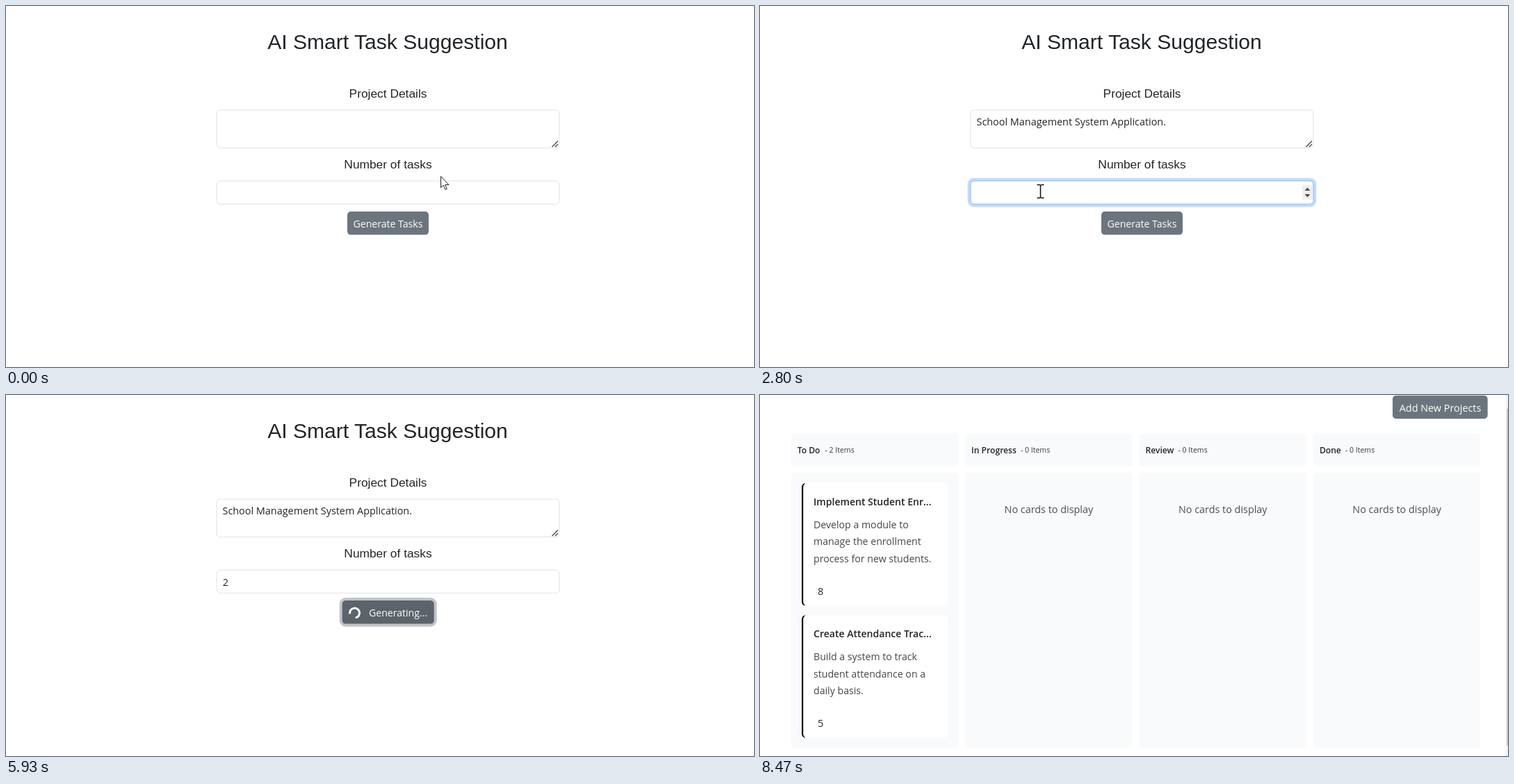
Write an HTML page that moves like this. It is 1076 by 520 pixels and loops after 9470 ms.

```html
<!DOCTYPE html>
<html lang="en">
<head>
<meta charset="utf-8">
<title>AI Smart Task Suggestion</title>
<style>
html, body { margin: 0; width: 100%; height: 100%; overflow: hidden; background: #fff; }
svg { display: block; width: 1076px; height: 520px; }
text { font: 14.4px "Open Sans", "Noto Sans", sans-serif; fill: #212529; white-space: pre; }
.head { font-family: "Liberation Sans", Arial, sans-serif; font-size: 17.35px; }
.title { font-size: 30.1px; }
.mid { text-anchor: middle; }
.btn { fill: #fff; font-size: 14.1px; }
.bold { font-weight: 600; font-size: 14.05px; }
.column { font-weight: 600; font-size: 12.1px; }
.count { font-weight: 500; font-size: 10.5px; fill: #343a40; }
.body { font-size: 14.15px; fill: #42474d; }
.empty { fill: #495057; }
.field { fill: #fff; stroke: #dee2e6; }
.focus .field { stroke: #86b7fe; }
.halo { fill: #c2dbfe; }
.panel { fill: #f8fafc; }
.pointer { fill: #fff; stroke: #222; stroke-linejoin: round; }
</style>
</head>
<body>
<svg viewBox="0 0 1076 520">
  <g id="form">
    <text class="head title mid" x="549" y="62">AI Smart Task Suggestion</text>
    <text class="head mid" x="549.5" y="131.5">Project Details</text>
    <text class="head mid" x="549.5" y="233.8">Number of tasks</text>

    <rect class="field" x="303" y="150" width="493" height="54.5" rx="5"/>
    <rect class="field" x="303" y="252" width="493" height="33.3" rx="5"/>
    <g class="focus" id="detailsFocus">
      <rect class="halo" x="298.7" y="145.7" width="501.6" height="63.1" rx="9"/>
      <rect class="field" x="303" y="150" width="493" height="54.5" rx="5"/>
    </g>
    <g class="focus" id="numberFocus">
      <rect class="halo" x="298.7" y="247.7" width="501.6" height="41.9" rx="9"/>
      <rect class="field" x="303" y="252" width="493" height="33.3" rx="5"/>
    </g>
    <path d="M785.5 203l8.5-8.5M790 203l4-4" stroke="#444" stroke-width="1.3"/>
    <g id="stepper">
      <rect x="780" y="258" width="15" height="21" fill="#efefef"/>
      <path d="M783.5 266l4-4.5 4 4.5zM783.5 271l4 4.5 4-4.5z" fill="#505050"/>
    </g>
    <text id="details" x="311.5" y="172">School Management System Application.</text>
    <text id="number" x="311.7" y="274.5">2</text>
    <rect id="caret" width="1" height="20" fill="#212529"/>

    <rect id="buttonHalo" y="292" height="41.7" rx="9" fill="#c0c4c8"/>
    <rect id="button" y="296" height="33.6" rx="5"/>
    <text class="btn mid" id="generate" x="549.5" y="319">Generate Tasks</text>
    <g id="generating">
      <text class="btn" x="522" y="319">Generating...</text>
      <path id="spinner" d="M4.95 4.95A7 7 0 1 1 4.95 -4.95" fill="none" stroke="#fff" stroke-width="3"/>
    </g>
  </g>
  <g id="board"></g>
  <path class="pointer" id="arrow" d="M.5.5V16.5L4.2 13.2 6.9 19.3 9.3 18.3 6.7 12.5H12Z"/>
  <path id="beam" d="M-5 -9.5h3.5l1.5 1 1.5-1H5M0 -8.5v17M-5 9.5h3.5l1.5-1 1.5 1H5" fill="none" stroke="#111" stroke-width="1.5"/>
  <path class="pointer" id="hand" d="M-1.7 13V1.5Q-1.7 0 0 0T1.7 1.5V7Q4 5.8 4.7 7.8 7 6.8 7.5 8.8 10 8 10 10.5V14Q10 17 8 20.5H0Q-1.5 17.5-4.5 14-6 11.5-4.2 11-3 11-1.7 13Z"/>
</svg>
<script>
const LOOP = 9470, STEP = 1000 / 15;
const BOARD_AT = 6270, SCROLL_AT = 7200, SUBMIT_AT = 4670;
const el = Object.fromEntries([...document.querySelectorAll('[id]')].map(node => [node.id, node]));

const text = (x, y, cls, content) => `<text class="${cls}" x="${x}" y="${y}">${content}</text>`;
const rect = (x, y, w, h, r, attrs) =>
  `<rect x="${x}" y="${y}" width="${w}" height="${h}" rx="${r}" ${attrs}/>`;

function card(y, title, lines, points) {
  return rect(60, y, 210.3, 176.5, 6, 'class="card" fill="#fff"') +
    `<path d="M65 ${y}q-5 1-5 6v164.5q0 5 5 6l-.5-1.2q-2.3-1-2.3-4.8v-164.5q0-3.8 2.3-4.8z"/>` +
    text(77, y + 31.6, 'bold', title) +
    lines.map((line, i) => text(77, y + 64.8 + i * 24.4, 'body', line)).join('') +
    text(83, y + 160.5, '', points);
}

const columns = [['To Do', 93.5, 2], ['In Progress', 375, 0], ['Review', 601.5, 0], ['Done', 842, 0]];
el.board.innerHTML = '<g id="content">' +
  rect(910, 0.7, 136.7, 33.5, 5, 'fill="#6c757d"') +
  '<text class="btn mid" style="font-size:14.4px" x="978.5" y="23.7">Add New Projects</text>' +
  columns.map(([name, countX, count], i) => {
    const x = 45 + i * 250.4;
    return rect(x, 56, 240, 46.5, 4, 'class="panel"') + rect(x, 112, 240, 396.5, 4, 'class="panel"') +
      text(x + 8.7, 84.3, 'column', name) + text(countX, 83.2, 'count', `- ${count} Items`) +
      (count ? '' : text(x + 120, 169.5, 'empty mid', 'No cards to display'));
  }).join('') +
  card(127, 'Implement Student Enr...',
    ['Develop a module to', 'manage the enrollment', 'process for new students.'], 8) +
  card(317.3, 'Create Attendance Trac...',
    ['Build a system to track', 'student attendance on a', 'daily basis.'], 5) +
  '</g>' + rect(1073, 0, 3, 520, 0, 'fill="#f1f1f1"') +
  rect(1074.5, 16, 2, 485, 0, 'id="thumb" fill="#b8b8b8"');
const content = document.getElementById('content');
const thumb = document.getElementById('thumb');
const secondCard = document.querySelectorAll('.card')[1];

// [time, x, y]; an entry without a position hides the pointer
const pointerPath = [
  [0, 625, 245], [400, 579.5, 185], [1530, 579.5, 185], [2070, 403.5, 267],
  [3530, 403.5, 267], [3730, 499, 303], [3930, 521, 313], [4800, 521, 313],
  [5270, 274, 499], [5330],
  [6530, 317, 419], [6670, 411, 395], [6730, 398, 383], [6800, 398, 383], [6870, 411, 395],
  [8000, 411, 395], [8270, 190, 420], [8400, 120, 512], [8470]
];

// [from, to, x, y]
const caretSpans = [
  [670, 1200, 312, 156], [1330, 1860, 583.5, 156],
  [2270, 2800, 312, 258], [2930, 3470, 320.3, 258], [4000, 4400, 320.3, 258]
];

const within = (v, from, to) => v >= from && v < to;
const show = (node, visible) => { node.style.display = visible ? '' : 'none'; };
const move = (node, x, y, angle = 0) =>
  node.setAttribute('transform', `translate(${x} ${y}) rotate(${angle})`);

function pointerAt(t) {
  const i = pointerPath.findLastIndex(key => key[0] <= t);
  const [t0, x0, y0] = pointerPath[i];
  if (x0 === undefined) return null;
  const [t1, x1, y1] = pointerPath[i + 1];
  const k = x1 === undefined ? 0 : (t - t0) / (t1 - t0);
  return { x: x0 + (x1 - x0) * k, y: y0 + (y1 - y0) * k };
}

function pointerKind({ x, y }, t) {
  if (t >= 4470) return 'arrow';
  if (within(x, 491, 608) && within(y, 296, 330)) return 'hand';
  return within(x, 303, 797) && (within(y, 150, 205) || within(y, 252, 286)) ? 'beam' : 'arrow';
}

function drawPointer(t) {
  const p = pointerAt(t);
  const kind = p && pointerKind(p, t);
  for (const name of ['arrow', 'beam', 'hand']) {
    show(el[name], name === kind);
    if (p) move(el[name], p.x, p.y);
  }
  const overCard = p && t >= BOARD_AT && within(p.x, 60, 270) && within(p.y, 317, 493);
  secondCard.setAttribute('fill', overCard ? '#f3f5f7' : '#fff');
  return p;
}

function drawButton(t) {
  const busy = t >= SUBMIT_AT;
  const x = busy ? 483.7 : 491, width = busy ? 132 : 117;
  el.button.setAttribute('x', x);
  el.button.setAttribute('width', width);
  el.buttonHalo.setAttribute('x', x - 4);
  el.buttonHalo.setAttribute('width', width + 8);
  el.button.setAttribute('fill',
    t < 3800 ? '#6c757d' : t < 3870 ? '#646c74' : within(t, 4400, SUBMIT_AT) ? '#565e64' : '#5c636a');
  show(el.buttonHalo, t >= 4400);
  show(el.generate, !busy);
  show(el.generating, busy);
  move(el.spinner, 501.5, 314, (t - 5930) / 750 * 360 + 125);
}

function drawForm(t, pointer) {
  el.detailsFocus.style.opacity = within(t, 670, 2270) ? 1 : within(t, 2270, 2330) ? 0.5 : 0;
  el.numberFocus.style.opacity = within(t, 2330, 4400) ? 1
    : within(t, 2270, 2330) || within(t, 4400, 4470) ? 0.5 : 0;
  show(el.details, t >= 1330);
  show(el.number, t >= 2930);
  show(el.stepper, within(t, 2270, 4400) ||
    t < 2270 && pointer && within(pointer.y, 252, 286));

  const caret = caretSpans.find(([from, to]) => within(t, from, to));
  show(el.caret, caret);
  if (caret) move(el.caret, caret[2], caret[3]);
  drawButton(t);
}

function draw(now) {
  // The screen updates 15 times a second, with times rounded to 10 ms
  const t = Math.round(Math.floor((now % LOOP + 4) / STEP) * STEP / 10) * 10;
  const pointer = drawPointer(t);
  const onBoard = t >= BOARD_AT;
  show(el.form, !onBoard);
  show(el.board, onBoard);
  if (onBoard) {
    const scrolled = t >= SCROLL_AT;
    move(content, 0, scrolled ? 0 : 4);
    move(thumb, 0, scrolled ? 4 : 0);
  } else {
    drawForm(t, pointer);
  }
}

const start = performance.now();
function tick() {
  draw(performance.now() - start);
  requestAnimationFrame(tick);
}
tick();
</script>
</body>
</html>
```
